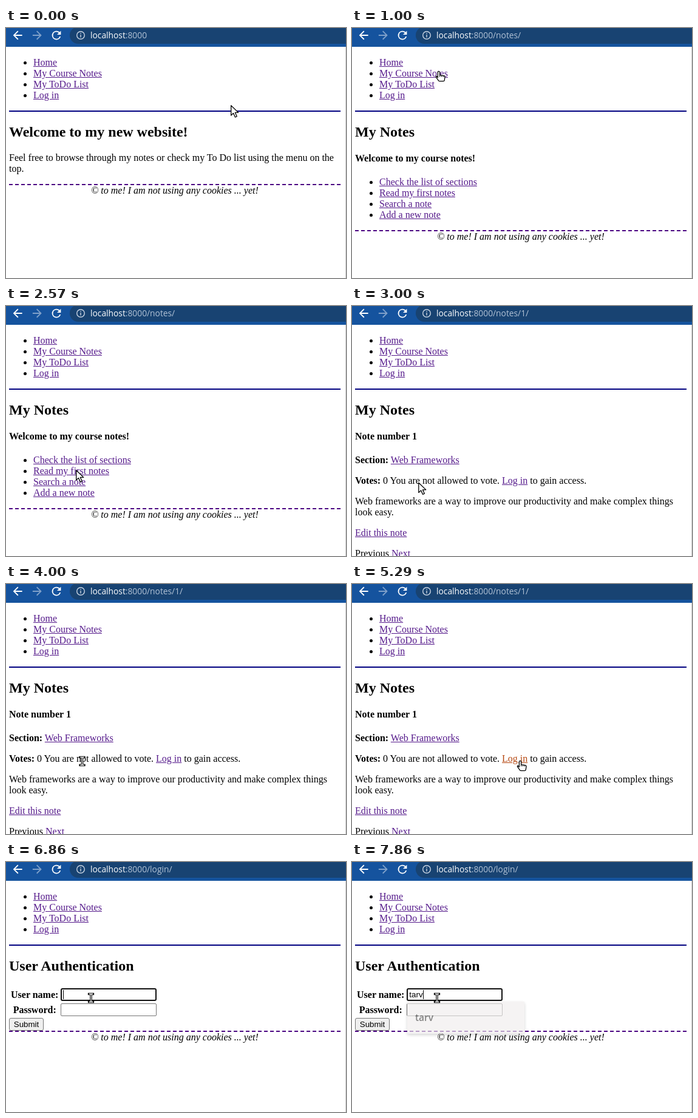
Write an HTML page that moves like this. It is 560 by 412 pixels and loops after 8 s.

```html
<!DOCTYPE html>
<html lang="en">
<head>
<meta charset="utf-8">
<title>Notes website</title>
<style>
html, body { margin: 0; width: 100%; height: 100%; overflow: hidden; background: #fff; }
#stage { position: relative; width: 560px; height: 412px; overflow: hidden; font: 16px/18px "Liberation Serif", serif; color: #000; }
#stage::after { content: ""; position: absolute; left: 559px; top: 31px; width: 1px; height: 381px; background: #ccc; }
#bar { position: absolute; width: 560px; height: 31px; background: #15539e; }
#pill { position: absolute; left: 105px; top: -2px; width: 480px; height: 28px; border-radius: 14px; background: #184372; }
#bar svg { position: absolute; left: 0; top: 0; }
#url { position: absolute; left: 139px; top: 3px; font: 13.8px/18px "Open Sans", sans-serif; color: #b3c3d6; white-space: pre; }
#url b { font-weight: 400; color: #fff; }
#content { position: absolute; left: 5px; top: 32px; width: 546px; display: flow-root; }
ul { margin: 16px 0; padding-left: 40px; }
u { color: #551a8b; }
u.active { color: #b5460f; }
nav { display: flow-root; border-bottom: 2px solid navy; }
h2 { font-size: 24px; line-height: 27px; margin: 20px 0; }
h4 { margin: 21px 0; }
p { margin: 16px 0; }
section { display: none; }
section.shown { display: flow-root; }
footer { border-top: 2px dashed indigo; text-align: center; font-style: italic; }
table { border-spacing: 2px; border-collapse: separate; }
th, td { padding: 1px; }
.field, .button { box-sizing: border-box; height: 21px; border: 1px solid #767676; border-radius: 2px; font: 13.33px/19px "Liberation Sans", sans-serif; }
.field { width: 158px; }
.focus { border: 2px solid #101010; border-radius: 3px; padding-left: 2px; line-height: 17px; white-space: pre; }
#caret { display: inline-block; width: 1px; height: 15px; background: #000; vertical-align: -3px; }
.button { width: 57px; background: #efefef; border-radius: 3px; text-align: center; }
#popup { position: absolute; left: 91px; top: 230px; width: 193px; height: 53px; border-radius: 2px; background: #f0eeed; box-shadow: 0 2px 5px #0004; }
#popup span { position: absolute; left: 13px; top: 16px; font: 600 15.5px/20px "Open Sans", sans-serif; color: #444; }
#pointer { position: absolute; left: 0; top: 0; overflow: visible; z-index: 1; }
#pointer g { display: none; fill: #fff; stroke: #000; stroke-width: 1.3; stroke-linejoin: round; }
#pointer g.shown { display: inline; }
</style>
</head>
<body>
<div id="stage">
  <div id="content">
    <nav><ul><li><u>Home</u><li><u>My Course Notes</u><li><u>My ToDo List</u><li><u>Log in</u></ul></nav>
    <section id="home">
      <h2>Welcome to my new website!</h2>
      <p>Feel free to browse through my notes or check my To Do list using the menu on the top.</p>
    </section>
    <section id="notes">
      <h2>My Notes</h2>
      <h4>Welcome to my course notes!</h4>
      <ul><li><u>Check the list of sections</u><li><u>Read my first notes</u><li><u>Search a note</u><li><u>Add a new note</u></ul>
    </section>
    <section id="note">
      <h2>My Notes</h2>
      <h4>Note number 1</h4>
      <p><b>Section:</b> <u>Web Frameworks</u></p>
      <p><b>Votes:</b> 0 You are not allowed to vote. <u id="loginLink">Log in</u> to gain access.</p>
      <p>Web frameworks are a way to improve our productivity and make complex things look easy.</p>
      <p><u>Edit this note</u></p>
      <p>Previous <u>Next</u></p>
    </section>
    <section id="login">
      <h2>User Authentication</h2>
      <table>
        <tr><th>User name:</th><td><div class="field focus"><span id="typed"></span><i id="caret"></i></div></td></tr>
        <tr><th>Password:</th><td><div class="field"></div></td></tr>
      </table>
      <div class="button">Submit</div>
    </section>
    <footer>© to me! I am not using any cookies ... yet!</footer>
  </div>
  <div id="bar">
    <div id="pill"></div>
    <svg width="140" height="31" fill="#fff">
      <path id="back" transform="translate(8 .8) scale(.93)" d="M20 11H7.83l5.59-5.59L12 4l-8 8 8 8 1.41-1.41L7.83 13H20z"/>
      <use href="#back" transform="translate(70.5 0) scale(-1 1)" opacity=".45"/>
      <path transform="translate(72 1) scale(.92)" d="M17.65 6.35A8 8 0 1 0 19.73 14h-2.08A6 6 0 1 1 12 6c1.66 0 3.14.69 4.22 1.78L13 11h7V4z"/>
      <g fill="none" stroke="#c9d4e2" stroke-width="1.4"><circle cx="123" cy="12" r="6.3"/><path d="M123 8.3v1.5M123 11v4.6"/></g>
    </svg>
    <div id="url"><b>localhost</b>:8000<span id="path"></span></div>
  </div>
  <div id="popup"><span>tarv</span></div>
  <svg id="pointer" width="1" height="1">
    <g id="arrow"><path d="M.7.7V17l3.8-3.6 3 6.6 2.8-1.3-2.9-6.3h5.3z"/></g>
    <g id="hand"><path d="M-1.6 10.5V2a1.6 1.6 0 0 1 3.2 0V6.6l6.6 1.1q2 .4 1.8 2.5l-.8 5q-.2 1.5-1.6 1.5H1.2q-1 0-1.6-.8L-4.5 10.2q-.4-1.4.8-1.7z"/><path d="M1.6 6.6v3M4.4 7.2v2.4M7.2 7.6v2.2" stroke-width="1"/></g>
    <g id="ibeam"><path id="beam" d="M-3.3-6.5H3.3M0-6.5V6.5M-3.3 6.5H3.3" stroke-width="3.6" stroke-linecap="square"/><path d="M-3.3-6.5H3.3M0-6.5V6.5M-3.3 6.5H3.3" stroke="#fff" stroke-width="1.3"/></g>
  </svg>
</div>
<script>
const LOOP = 8000, TICKS_PER_SECOND = 7;
const $ = id => document.getElementById(id);

// All times below are in ticks.
const pages = [[0, 'home', ''], [7, 'notes', '/notes/'], [19, 'note', '/notes/1/'], [40, 'login', '/login/']];
const pointers = [[0, 'arrow'], [5, 'hand'], [10, 'arrow'], [14, 'hand'], [18, 'arrow'],
  [22, 'ibeam'], [34, 'hand'], [38, 'arrow'], [41, 'ibeam']];
const typing = [[0, ''], [51, 't'], [52, 'ta'], [54, 'tar'], [55, 'tarv']];
const popups = [[0, 0, 53], [51, .6, 182], [52, 1, 53], [55, .65, 53]];
const route = [[0, 370, 127], [5, 143, 71], [8, 143, 71], [15, 115, 270], [18, 115, 270], [25, 100, 322],
  [27, 100, 322], [28, 125.5, 292], [35, 277, 291], [37, 277, 291], [43, 140, 224]];

const current = (steps, tick) => steps.filter(step => step[0] <= tick).pop();

function positionAt(tick) {
  const from = current(route, tick);
  const to = route[route.indexOf(from) + 1] || from;
  const p = (tick - from[0]) / (to[0] - from[0] || 1);
  const ease = p * p * (3 - 2 * p);
  return [1, 2].map(i => from[i] + (to[i] - from[i]) * ease);
}

function showOnly(selector, id) {
  document.querySelectorAll(selector).forEach(el => el.classList.toggle('shown', el.id === id));
}

function render(time) {
  const tick = Math.floor((time % LOOP + 5) * TICKS_PER_SECOND / 1000);
  const [, page, path] = current(pages, tick);
  showOnly('section', page);
  $('path').textContent = path;
  $('loginLink').classList.toggle('active', tick === 37);

  $('typed').textContent = current(typing, tick)[1];
  $('caret').style.opacity = tick >= 44 && tick < 48 ? 0 : 1;
  const [, opacity, height] = current(popups, tick);
  $('popup').style.opacity = opacity;
  $('popup').style.height = height + 'px';

  showOnly('#pointer g', current(pointers, tick)[1]);
  const [x, y] = positionAt(tick);
  $('pointer').style.transform = `translate(${x}px, ${y}px)`;
}

const start = performance.now();
function frame() {
  render(performance.now() - start);
  requestAnimationFrame(frame);
}
frame();
</script>
</body>
</html>
```
